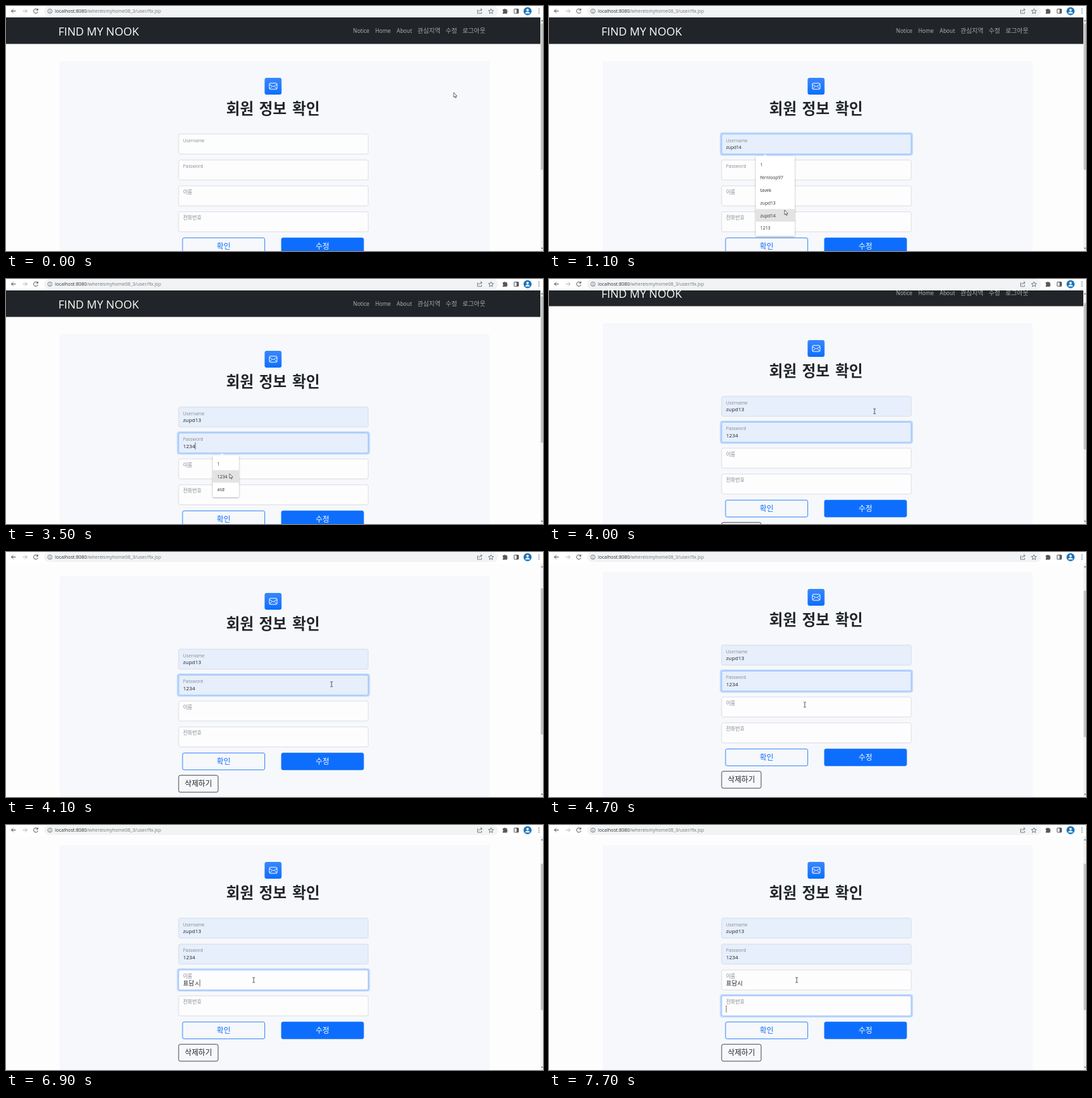
An HTML page with a canvas for the animation above (8 s loop, 800 px wide and 365 px high).

```html
<!DOCTYPE html>
<html lang="ko">
<head>
<meta charset="utf-8">
<title>회원 정보 확인</title>
<style>
html, body { margin: 0; width: 100%; height: 100%; overflow: hidden; background: #fefdfe; }
canvas { display: block; width: 800px; height: 365px; }
</style>
</head>
<body>
<canvas id="stage"></canvas>
<script>
const W = 800, H = 365, LOOP = 8000, STEP = 100;
const FONT = '"Open Sans", "Noto Sans CJK KR", "Noto Sans CJK", sans-serif';
const BLUE = '#0d6efd', INK = '#212529';
const canvas = document.getElementById('stage');
const c = canvas.getContext('2d');
const ratio = window.devicePixelRatio || 1;
canvas.width = W * ratio;
canvas.height = H * ratio;

// Key lists: [time, ...values]
const pointerKeys = [
  [0, 667, 129], [400, 328, 207], [700, 328, 207], [1100, 351, 304], [1500, 351, 304],
  [1800, 345, 288], [2000, 345, 288], [2300, 292, 249], [2700, 292, 249], [3000, 328, 272],
  [3300, 333, 290], [3600, 333, 290], [3900, 485, 197], [4300, 485, 197], [4800, 369, 231]
];
const scrollKeys = [[3900, 0], [4000, 16], [4100, 46], [4200, 51], [4300, 52]];
const nameTyping = [
  [6000, 'ㅍ'], [6100, '표'], [6300, '표ㄷ'], [6400, '표다'],
  [6600, '표담'], [6900, '표담ㅅ'], [7000, '표담시']
];
const arrowTimes = [[0, 400], [800, 2200], [2900, 3800]];

const fields = [
  { label: 'Username', focus: [550, 2400], caret: [[600, 800]], commit: 2000, value: 'zupd13',
    menu: { from: 700, to: 2100, width: 58,
      items: ['1', 'fernloop97', 'tavek', 'zupd13', 'zupd14', '1213'] } },
  { label: 'Password', focus: [2400, 4950], caret: [[2400, 2800], [3500, 3800]], commit: 3500, value: '1234',
    menu: { from: 2700, to: 3600, width: 39, items: ['1', '1234', 'asd'] } },
  { label: '이름', focus: [4950, 7350], caret: [[5000, 5600], [6000, 7400]],
    menu: { from: 5200, to: 5400, width: 149, items: ['1', '1213', '1234', 'asd', '', ''] } },
  { label: '전화번호', focus: [7350, 9000], caret: [[7400, 8000]] }
];
fields.forEach((f, i) => f.y = 190.5 + i * 38.6);

const clamp = v => Math.max(0, Math.min(1, v));
const within = (t, spans) => spans.some(([a, b]) => t >= a && t < b);

function along(keys, t) {
  if (t <= keys[0][0]) return keys[0].slice(1);
  const i = keys.findIndex(k => k[0] > t);
  if (i < 0) return keys[keys.length - 1].slice(1);
  const [a, b] = [keys[i - 1], keys[i]];
  const p = (t - a[0]) / (b[0] - a[0]), e = p * p * (3 - 2 * p);
  return a.slice(1).map((v, n) => v + (b[n + 1] - v) * e);
}

function rect(x, y, w, h, fill, r = 0, stroke, line = 0.8) {
  c.beginPath();
  c.roundRect(x, y, w, h, r);
  if (fill) { c.fillStyle = fill; c.fill(); }
  if (stroke) { c.strokeStyle = stroke; c.lineWidth = line; c.stroke(); }
}

function text(s, x, y, size, color, align = 'left', weight = 400) {
  c.font = `${weight} ${size}px ${FONT}`;
  c.fillStyle = color;
  c.textAlign = align;
  c.fillText(s, x, y);
  return c.measureText(s).width;
}

function path(d, stroke, line = 1, fill) {
  const p = new Path2D(d);
  if (fill) { c.fillStyle = fill; c.fill(p); }
  if (stroke) { c.strokeStyle = stroke; c.lineWidth = line; c.stroke(p); }
}

function circle(x, y, r, fill, stroke, line) {
  rect(x - r, y - r, 2 * r, 2 * r, fill, r, stroke, line);
}

function drawToolbar() {
  const gray = '#5f6368';
  rect(0, 0, W, 17, '#fff');
  rect(57, 0.5, 676, 14.5, '#f1f3f4', 7);
  path('M14.5 7.5H8M11 4.5L8 7.5L11 10.5', '#50545a');
  path('M25 7.5H31.5M28.5 4.5L31.5 7.5L28.5 10.5', '#b4b6b9');
  path('M47 5.5A3.3 3.3 0 1 0 47.6 8.5M47.5 3.8V6.2H45', '#50545a');
  circle(65.5, 7.7, 3.2, null, gray, 0.8);
  path('M65.5 7.2V9.6M65.5 5.6V6.3', gray, 0.8);
  const w = text('localhost:8080', 73, 10.3, 7, '#303236');
  text('/whereismyhome08_3/user/fix.jsp', 73 + w, 10.3, 7, '#74777b');
  path('M704 6H702.5V11H708.5V9M704.5 8.5Q705 5.5 709 5.5M707 3.5L709.3 5.5L707 7.5', gray, 0.8);
  path('M722.5 4L723.6 6.6L726.3 6.8L724.2 8.6L724.9 11.3L722.5 9.8L720.1 11.3L720.8 8.6L718.7 6.8L721.4 6.6Z', gray, 0.8);
  path('M740 5H742A1.3 1.3 0 0 1 744.5 5H746.5V7.2A1.3 1.3 0 0 1 746.5 9.6V11.5H740V9.5A1.2 1.2 0 0 0 740 7.2Z', null, 0, '#55595e');
  rect(757, 4.5, 6.4, 6.4, null, 0.5, '#55595e', 1);
  rect(760.6, 4.5, 3, 6.4, '#55595e');
  circle(777, 7.8, 6, '#1a73b8');
  circle(777, 6, 1.9, '#e6f1fa');
  path('M773.3 11.2Q773.8 8.6 777 8.6Q780.2 8.6 780.7 11.2Z', null, 0, '#e6f1fa');
  [4.5, 7.5, 10.5].forEach(y => circle(794, y, 0.8, '#55595e'));
}

function drawScrollbar(scroll) {
  rect(796, 17, 4, H - 17, '#f1f1f1');
  rect(796.7, 26 + scroll * 0.61, 3.3, 218, '#c1c1c1');
  path('M797 23L798.5 20.5L800 23Z', null, 0, '#777');
  path('M797 360L798.5 362.5L800 360Z', null, 0, '#777');
}

function drawNav() {
  rect(0, 17, 796, 39.5, INK);
  text('FIND MY NOOK', 78, 44, 16.7, '#fff');
  [['Notice', 517], ['Home', 550], ['About', 582]].forEach(([s, x]) => text(s, x, 40.3, 8.15, '#b5b7b9'));
  [['관심지역', 613], ['수정', 655], ['로그아웃', 680]].forEach(([s, x]) => text(s, x, 40.3, 9.3, '#a5a8aa'));
}

function drawHeading() {
  const shade = c.createLinearGradient(0, 107, 0, 132);
  shade.addColorStop(0, '#3887fd');
  shade.addColorStop(1, BLUE);
  rect(385.3, 107, 25.2, 25, shade, 3);
  rect(392.3, 115, 11.5, 9, null, 1.5, '#fff', 1);
  path('M392.5 116.8L398 120.3L403.6 116.8M392.8 123.3L396.6 119.6M403.3 123.3L399.5 119.6', '#fff', 0.9);
  [['회원', 348.5], ['정보', 397.5], ['확인', 447]].forEach(([s, x]) => text(s, x, 161, 22.3, INK, 'center', 700));
}

function buttonBox(label, x, y, w, color, filled) {
  rect(x, y, w, 25.2, filled ? color : null, 2.5, color, 0.8);
  text(label, x + w / 2, y + 16.7, 11.1, filled ? '#fff' : color, 'center');
}

// Row under the pointer in an open suggestion list, or -1
function hoveredRow(field, t, pointer) {
  const m = field.menu;
  if (!m || t < m.from || t >= m.to || !within(t, arrowTimes)) return -1;
  const row = Math.floor((pointer[1] - field.y - 37) / 18.8);
  return row < m.items.length && pointer[0] < 308 + m.width ? row : -1;
}

function fieldValue(field, t, row) {
  if (field.commit) {
    if (t >= field.commit) return [field.value, 7.85];
    return [row >= 0 ? field.menu.items[row] : '', 6.65];
  }
  const typed = field.label === '이름' ? nameTyping.filter(k => k[0] <= t).pop() : null;
  return [typed ? typed[1] : '', 9];
}

function drawField(field, t, pointer) {
  const { y, label, focus } = field;
  const [value, size] = fieldValue(field, t, hoveredRow(field, t, pointer));
  const ring = clamp((t - focus[0]) / 150) - clamp((t - focus[1]) / 150);
  if (ring > 0) {
    c.globalAlpha = ring;
    rect(254.6, y - 2.2, 287.6, 34.6, '#bfd8fc', 4);
    c.globalAlpha = 1;
  }
  const border = ring > 0.5 ? '#86b7fe' : '#d3d8dd';
  rect(257.2, y + 0.3, 282.4, 29.8, value && field.commit ? '#e6effb' : '#fefdfe', 2.5, border);
  const korean = label.charCodeAt(0) > 255;
  text(label, 263.7, y + 12, korean ? 7.5 : 6.65, '#858b91');
  const w = text(value, 263.7, y + 22.8, size, INK);
  if (within(t, field.caret)) rect(263.7 + w, y + 14.5, 0.7, 10.5, '#333');
}

function drawMenu(field, t, pointer, scroll) {
  const m = field.menu;
  if (!m || t < m.from || t >= m.to) return;
  const top = field.y - scroll + 33.5, row = hoveredRow(field, t, pointer);
  c.save();
  c.shadowColor = 'rgba(0,0,0,.3)';
  c.shadowBlur = 3 * ratio;
  c.shadowOffsetY = ratio;
  rect(308, top, m.width, m.items.length * 18.8 + 6, '#fff', 1.5);
  c.restore();
  path(`M319 ${top}L322 ${top - 3}L325 ${top}Z`, null, 0, '#fff');
  m.items.forEach((item, i) => {
    const y = top + 3.3 + i * 18.8;
    if (i === row) rect(308, y, m.width, 18.8, '#e3e3e3');
    text(item, 314.7, y + 12, 6.65, '#333');
  });
}

function drawPointer(t, [x, y]) {
  c.save();
  c.translate(x, y);
  if (within(t, arrowTimes)) {
    path('M0 0V7L1.6 5.6L2.7 8L3.8 7.5L2.8 5.2H4.9Z', '#333', 0.7, '#fff');
  } else {
    path('M-1.8 -3.8Q0 -3.8 0 -3Q0 -3.8 1.8 -3.8M0 -3V3M-1.8 3.8Q0 3.8 0 3Q0 3.8 1.8 3.8', '#333', 0.8);
  }
  c.restore();
}

function draw(now) {
  const t = Math.floor((now % LOOP) / STEP) * STEP;
  const [scroll] = along(scrollKeys, t);
  const pointer = along(pointerKeys, t);
  c.setTransform(ratio, 0, 0, ratio, 0, 0);
  rect(0, 0, W, H, '#fefdfe');

  c.save();
  c.translate(0, -scroll);
  drawNav();
  rect(80, 82, 640.5, 420, '#f6f8fb', 3);
  drawHeading();
  fields.forEach(f => drawField(f, t, pointer));
  buttonBox('확인', 263, 345.4, 122.5, BLUE, false);
  buttonBox('수정', 410.3, 345.4, 122.5, BLUE, true);
  buttonBox('삭제하기', 257.2, 378.7, 58.8, INK, false);
  c.restore();

  drawToolbar();
  drawScrollbar(scroll);
  fields.forEach(f => drawMenu(f, t, pointer, scroll));
  drawPointer(t, pointer);
  requestAnimationFrame(tick);
}

const start = performance.now();
function tick() { draw(performance.now() - start); }
tick();
</script>
</body>
</html>
```
